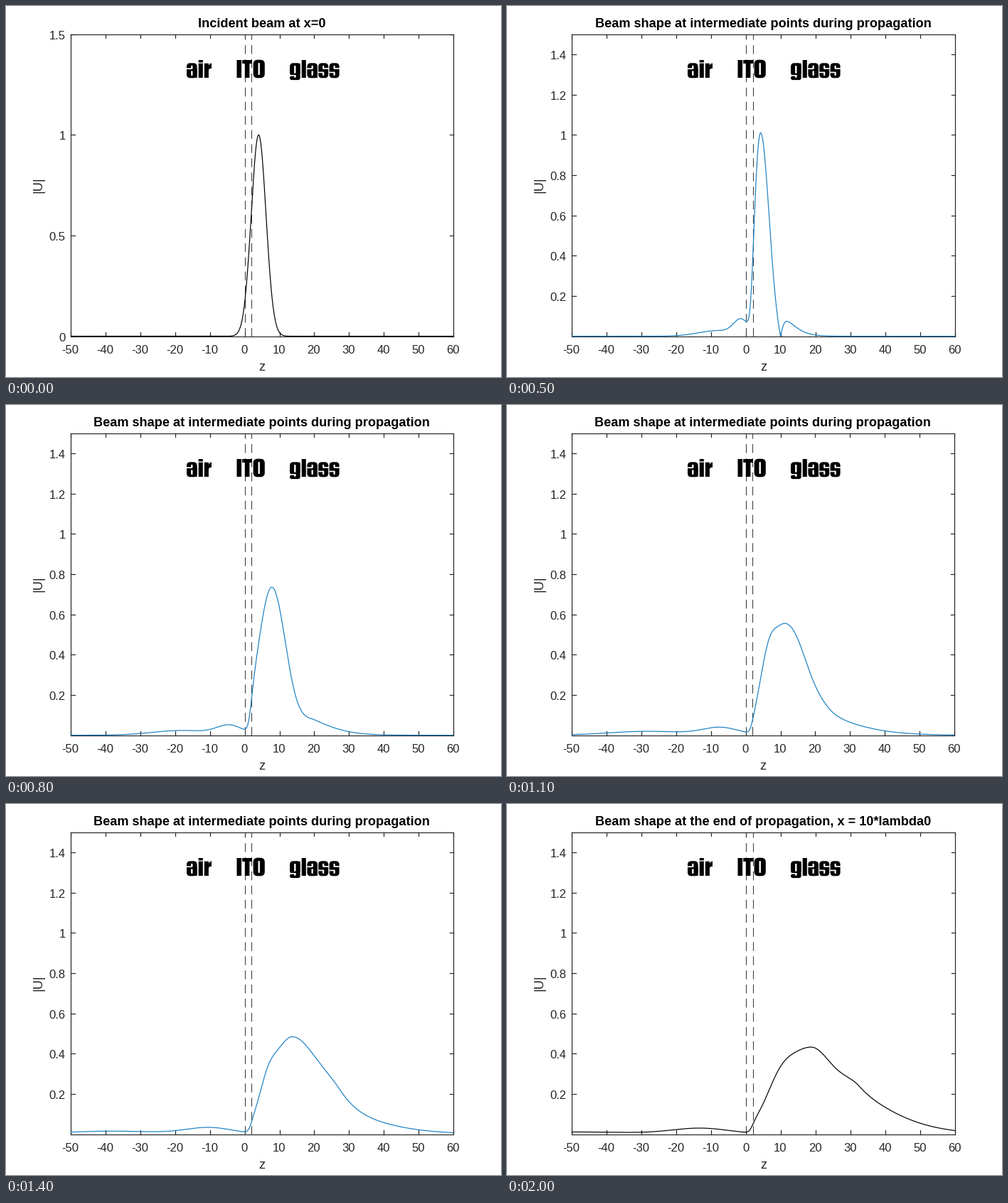
Recreate the animation shown at these times as a matplotlib script. Size 696 by 522 pixels, loop 2.2 s.

```python
import numpy as np
import matplotlib.pyplot as plt
from matplotlib.animation import FuncAnimation
from matplotlib.patches import FancyBboxPatch, Polygon, Rectangle

W, H, DPI = 696, 522, 96
PT = 72 / DPI                      # points per pixel
LEFT, TOP, BOTTOM = 91.1, 39.6, 464.6
INK, BLUE = "#262626", "#1A80C4"
plt.rcParams["font.family"] = "Liberation Sans"

fig = plt.figure(figsize=(W / DPI, H / DPI), dpi=DPI, facecolor="white")
ax = fig.add_axes([0, 0, 1, 1])

Z = np.linspace(-50, 60, 1600)


def bump(height, center, left, right, power=2):
    """Bell with its own width on each side; a low power gives a long right tail."""
    d = Z - center
    side = np.where(d < 0, (np.abs(d) / left) ** 2, (np.abs(d) / right) ** power)
    return height * np.exp(-side)


def beam(n, main, tail, shoulder=None):
    """|U| after n steps: ripples leaking into air, lobes confined to glass."""
    near = bump(.018 + .055 / n, 1.5 - 2.9 * n, 2.2 * n + .8, 2.2 * n + .8)
    far = bump(.032 - .0042 * n, 2 - 10 * n, 4 + 4 * n, 4 + 4 * n)
    glass = bump(*main) + bump(*tail, power=1.4)
    if shoulder:
        glass += bump(*shoulder)
    gate = 1 / (1 + np.exp((1.5 - Z) / .5))
    return np.abs(near + far + gate * glass)


# each lobe: height, centre, left width, right width
INCIDENT = bump(1, 4, 3, 3)
BEAMS = [
    beam(1, (1.01, 4.15, 2.7, 3.4), (-.084, 11.3, 2.3, 4.3)),
    beam(2, (.734, 7.8, 5.5, 5.6), (.071, 19.8, 5.5, 8)),
    beam(3, (.526, 11.8, 6, 7.5), (.098, 22.8, 8, 12.8), (.225, 6.2, 3.6, 3.3)),
    beam(4, (.479, 13.6, 8, 11), (.122, 26.8, 7, 15.8), (.11, 6.5, 3.4, 3.4)),
    beam(5, (.417, 18.6, 11, 9), (.202, 31.8, 7.5, 15), (.114, 9.3, 5.5, 5.5)),
]

MID = "Beam shape at intermediate points during propagation"
END = "Beam shape at the end of propagation, x = 10*lambda0"

# title, profile, colour, right edge of the plot, labelled y step, hold (x 100 ms)
SCENES = [
    ("Incident beam at x=0", INCIDENT, "black", 629.1, .5, 5),
    (MID, BEAMS[0], BLUE, 630.1, .2, 3),
    *[(MID, u, BLUE, 629.1, .2, 3) for u in BEAMS[1:4]],
    (END, BEAMS[4], "black", 630.1, .2, 5),
]
ORDER = [n for n, s in enumerate(SCENES) for _ in range(s[-1])]


def line(xs, ys, color=INK, width=1.2, **kw):
    return ax.plot(xs, ys, color=color, lw=width * PT, **kw)[0]


def label(x, y, s, size=16.6, color=INK, ha="center", **kw):
    ax.text(x, y, s, fontsize=size * PT, color=color, ha=ha, va="baseline", **kw)


def box(x, y, w, h, r=0, color="black"):
    if r:
        p = FancyBboxPatch((x, y), w, h, boxstyle=f"round,pad=0,rounding_size={r}",
                           fc=color, lw=0, zorder=5)
    else:
        p = Rectangle((x, y), w, h, fc=color, lw=0, zorder=5, snap=False)
    ax.add_patch(p)


def cut(x, y, w, h, r=0):
    box(x, y, w, h, r, "white")


# Heavy condensed letters, each drawn from its left edge
def letter_a(x):
    box(x, 80.3, 14.6, 21, 5)
    box(x + 8.5, 88, 6.1, 13)
    cut(x + 6.1, 83.8, 2.4, 5, 1)
    cut(x - .3, 87.4, 7.5, 1.7)
    cut(x + 6.1, 91.3, 2.4, 6.6, 1)


def letter_s(x):
    box(x, 80.3, 14, 21, 5)
    cut(x + 5.9, 83.8, 2.2, 5, 1)
    cut(x + 7, 87.1, 7.3, 1.7)
    cut(x + 5.9, 92.6, 2.2, 5.4, 1)
    cut(x - .3, 92.6, 7.3, 1.7)


def letter_g(x):
    box(x, 80.3, 14.6, 18, 5)
    box(x, 98.3, 14.6, 5.8, 2.8)
    box(x + 8.5, 80.7, 6.1, 20)
    cut(x + 6.1, 84, 2.4, 10.8, 1)
    cut(x - .3, 97, 8.8, 1.5)
    cut(x + 6.1, 97, 2.4, 3.8, 1)


def letter_i(x):
    box(x, 76, 6.1, 3.4)
    box(x, 80.7, 6.1, 20.3)


def letter_r(x):
    box(x, 80.7, 6.1, 20.3)
    arm = [(6, 83.8), (7.8, 81.3), (10.2, 80.4), (10.2, 87.8), (7.4, 88.2), (6, 90.2)]
    ax.add_patch(Polygon([(x + a, b) for a, b in arm], fc="black", lw=0, zorder=5))


def media():
    letter_a(254)
    letter_i(270.7)
    letter_r(278.8)
    box(324.5, 76, 6.6, 25)
    box(332.2, 76, 13.8, 5)
    box(335.8, 76, 6.6, 25)
    box(347.6, 75.7, 16.2, 25.6, 6)
    cut(354.5, 80, 2.4, 17, 1.1)
    letter_g(399)
    box(415.7, 76, 6.1, 25)
    letter_a(423.4)
    letter_s(439.2)
    letter_s(454.6)


def draw(i):
    title, u, color, right, step, _ = SCENES[ORDER[i]]
    ax.clear()
    ax.set(xlim=(0, W), ylim=(H, 0))
    ax.axis("off")

    def px(z):
        return LEFT + (z + 50) * (right - LEFT) / 110

    def py(v):
        return BOTTOM - v * (BOTTOM - TOP) / 1.5

    for z in range(-50, 61, 10):
        line([px(z)] * 2, [BOTTOM, BOTTOM - 5.4])
        line([px(z)] * 2, [TOP, TOP + 5.4])
        label(px(z) - .6, 489, str(z))
    for v in np.arange(0 if step == .5 else step, 1.51, step):
        y = py(v)
        line([LEFT, LEFT + 5.4], [y, y])
        line([right, right - 5.4], [y, y])
        label(83.5, y + 7.2, f"{v:.3g}", ha="right")
    line([LEFT, right, right, LEFT, LEFT], [TOP, TOP, BOTTOM, BOTTOM, TOP],
         solid_joinstyle="miter")

    for z in (0, 2):
        line([px(z)] * 2, [BOTTOM, TOP], "#404040", 1.1, dashes=(12.4 / 1.1, 7.5 / 1.1),
             dash_capstyle="butt")
    curve = line(px(Z), py(u), color, 1.2, zorder=3)
    frame = Rectangle((LEFT, TOP), right - LEFT, BOTTOM - TOP + .6,
                      transform=ax.transData)
    curve.set_clip_path(frame)

    mid = (LEFT + right) / 2
    label(mid - .3, 29.5, title, 18.17, "black", weight="bold")
    label(mid, 513, "z", 18.25)
    label(50.5, 251.5, "|U|", 18.25, rotation=90, rotation_mode="anchor")
    media()
    return []


anim = FuncAnimation(fig, draw, frames=len(ORDER), interval=100,
                     init_func=lambda: draw(0), repeat=True, repeat_delay=0, blit=False)
plt.show()
```
